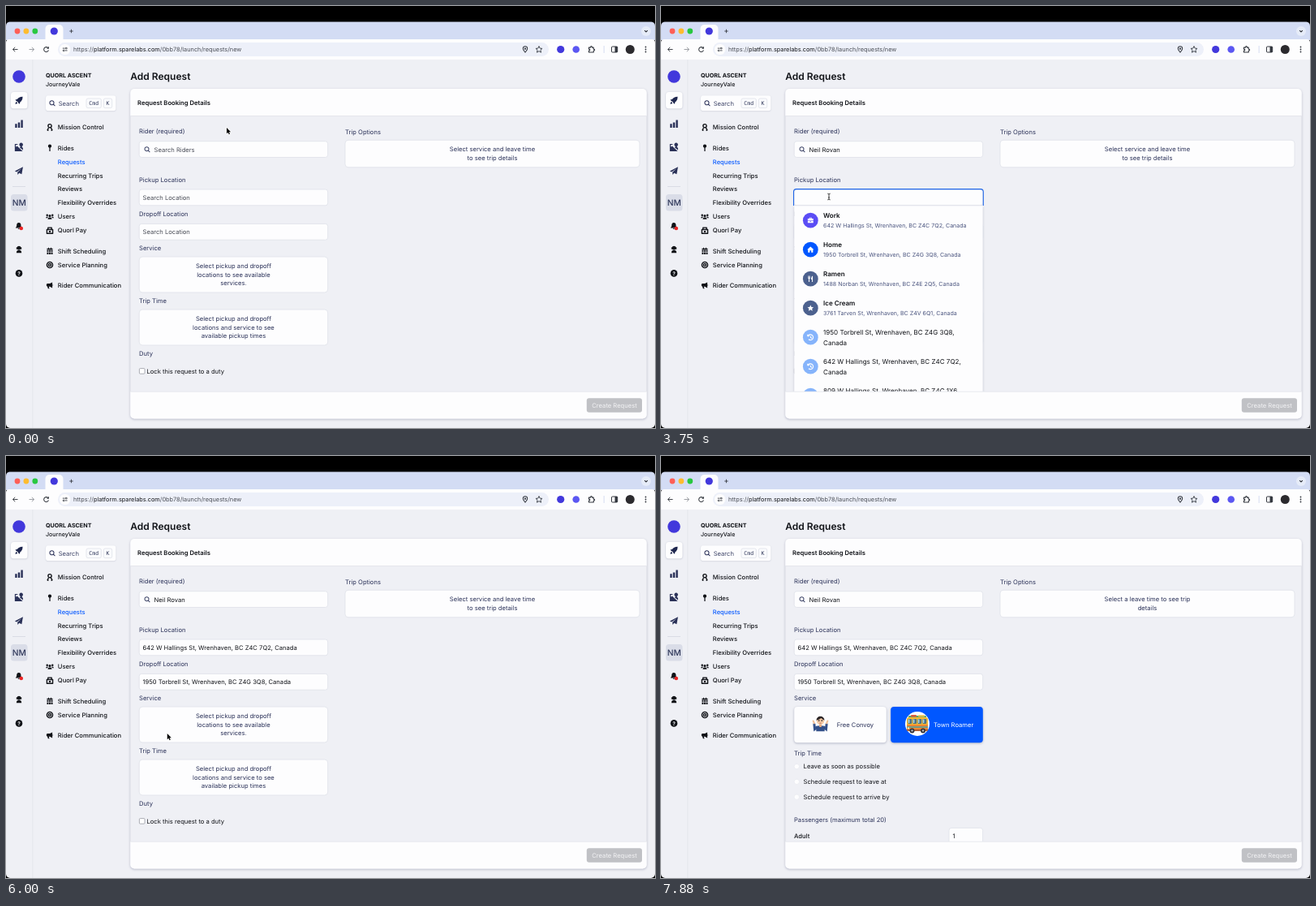
An HTML page with a canvas for the animation above (8000 ms loop, 800 px wide and 520 px high).

```html
<!DOCTYPE html>
<html lang="en">
<head>
<meta charset="utf-8">
<title>Add Request</title>
<style>
html, body { margin: 0; width: 100%; height: 100%; overflow: hidden; background: #000; }
canvas { display: block; width: 800px; height: 520px; }
</style>
</head>
<body>
<canvas id="stage"></canvas>
<script>
const LOOP = 8000;
const cv = document.getElementById('stage');
const c = cv.getContext('2d');
const dpr = window.devicePixelRatio || 1;
cv.width = 800 * dpr;
cv.height = 520 * dpr;

const BODY = 7.62, SMALL = 7.07, MID = 8.05;
const INK = '#111318', NAVY = '#2a3158', SLATE = '#4a547e', BLUE = '#0057ff';
const LINE = '#dfe1e9', WHITE = '#fdfdfe', PAGE = '#eff0f5', LOGO = '#4238dc';

const NAME = 'Neil Rovan', QUERY = NAME.toLowerCase();
const WORK = '642 W Hallings St, Wrenhaven, BC Z4C 7Q2, Canada';
const HOME = '1950 Torbrell St, Wrenhaven, BC Z4G 3Q8, Canada';
const PLACES = [
  ['Work', WORK, '#5b4df5', 'case'],
  ['Home', HOME, BLUE, 'house'],
  ['Ramen', '1488 Norban St, Wrenhaven, BC Z4E 2Q5, Canada', '#4c618e', 'fork'],
  ['Ice Cream', '3761 Tarven St, Wrenhaven, BC Z4V 6Q1, Canada', '#4c618e', 'star']
];
const RECENT = [HOME, WORK, '809 W Hallings St, Wrenhaven, BC Z4C 1X6, Canada'];

// Key times of the interaction, in ms
const T = { focus: 620, list: 745, type: 850, found: 1745, show: 2150, press: 2620, rider: 2750,
  pick: 3740, picked: 4480, drop: 5245, dropped: 5870, cards: 6120, chosen: 7490 };

// Pointer path: time, x, y
const PATH = [[0, 272, 150], [130, 272, 150], [620, 228, 177], [2150, 228, 177], [2500, 217, 202],
  [2750, 217, 202], [3400, 207, 235], [3800, 207, 235], [4250, 212, 264], [4500, 212, 264],
  [4950, 197, 276], [5400, 197, 276], [5760, 199, 342], [6520, 198, 342], [7150, 322, 334], [8000, 322, 334]];

// Glyphs drawn around 0,0; f = filled, s = stroked
const ICONS = {
  search: ['s', 'M-3.6-.6a3 3 0 1 0 6 0a3 3 0 1 0-6 0M1.6 1.6L4 4'],
  rocket: ['f', 'M5-5C1-5-1-3.5-2.5-1.5L-5-1-3.5 1-2.5 1.2-1.2 2.5-1 3.5 1 5 1.5 2.5C3.5 1 5-1 5-5ZM-3.4 2Q-5 2.5-5 5Q-2.5 5-2 3.4Z'],
  bars: ['f', 'M-5 0h2.5v5h-2.5ZM-1.3-2h2.6v7h-2.6ZM2.5-5h2.5v10h-2.5Z'],
  map: ['f', 'M-5.4-4.6H-1.6L-2-3.4H-4.2V-.6L-2.4-1.8 4.8 5H-5.4ZM2-1.4a2.4 2.4 0 1 1 1.6 0L5.2 1V3.4L1 .2Z'],
  plane: ['f', 'M5.2-5.2L3.5 4.2.2 2.8-1.6 5-2 1.8 3.2-3.2-3 1.3-5.4.2Z'],
  bell: ['f', 'M0-5C-2.5-5-3.2-3.2-3.2-1.2S-4 2-5 3H5C4 2 3.2 1 3.2-1.2S2.5-5 0-5ZM-1.5 3.7h3Q0 6-1.5 3.7Z'],
  agent: ['f', 'M0-5.2a3 3 0 1 1 0 6a3 3 0 1 1 0-6ZM-4 5.2Q-4 1.6-1.5 1.4H1.5Q4 1.6 4 5.2ZM-4-3.4h1.5v3h-1.5ZM2.5-3.4h1.5v3h-1.5Z'],
  head: ['s', 'M-2.7-2.3a2.7 2.7 0 1 0 5.4 0a2.7 2.7 0 1 0-5.4 0M-4 5L-2 1.2M4 5L2 1.2M-4 5H-2M4 5H2'],
  pin: ['f', 'M0-5.5a2.7 2.7 0 0 1 .8 5.3V5.5h-1.6V-.2a2.7 2.7 0 0 1 .8-5.3Z'],
  users: ['f', 'M0-3.6a2 2 0 1 1 0 4a2 2 0 1 1 0-4ZM-3.2 4Q-3 1-1 1H1Q3 1 3.2 4ZM-4.2-4a1.6 1.6 0 1 1 0 3.2a1.6 1.6 0 1 1 0-3.2ZM4.2-4a1.6 1.6 0 1 1 0 3.2a1.6 1.6 0 1 1 0-3.2ZM-6.2 2Q-6-.4-4.4-.4L-2.6 0-3.8 2ZM6.2 2Q6-.4 4.4-.4L2.6 0 3.8 2Z'],
  pay: ['s', 'M-4.6-1.5H4.6V4.6H-4.6ZM-2.8-1.5V-4.6H2.8V-1.5M-1.5 1.6H1.5M0 .4V2.8'],
  cal: ['f', 'M-4.5-4h2v-1.4h1.3V-4h2.4v-1.4h1.3V-4h2v2h-9ZM-4.5-1.3h2.5V1h-2.5ZM-1.2-1.3h2.4V1h-2.4ZM2-1.3h2.5V1H2ZM-4.5 1.8h2.5V5h-2.5ZM-1.2 1.8h2.4V5h-2.4ZM2 1.8h2.5V5H2Z'],
  target: ['s', 'M-4.6 0a4.6 4.6 0 1 0 9.2 0a4.6 4.6 0 1 0-9.2 0M-2 0a2 2 0 1 0 4 0a2 2 0 1 0-4 0'],
  horn: ['f', 'M4-5V4L0 2H-1.6L-.6 5H-2.8L-3.8 2Q-5.4 1.6-5.4-.6T-3.8-3H0ZM4.6-1.8q1.6 1.2 0 2.6Z'],
  case: ['f', 'M-2-4.5H2V-3H4.5V.4H-4.5V-3H-2ZM-1-3H1V-3.6H-1ZM-4.5 1H-1V2H1V1H4.5V4H-4.5Z'],
  house: ['f', 'M0-5L5.4 0H4V4.5H1.2V1.4H-1.2V4.5H-4V0H-5.4Z'],
  fork: ['f', 'M-4-5h.7v3h.6v-3h.8v3h.6v-3h.8v4L-1.7.2V5H-3V.2L-4-1ZM3.6-5V5H2.3V1.2H1Q1-4 3.6-5Z'],
  star: ['f', 'M0-5L1.5-1.7 5-1.4 2.4 1 3.2 4.6 0 2.7-3.2 4.6-2.4 1-5-1.4-1.5-1.7Z'],
  clock: ['s', 'M-3.8-2.4A4.4 4.4 0 1 1-3 3.3M-4.6-4.6V-1.9H-1.8M.3-2V.5L2 1.6'],
  back: ['s', 'M5 0H-5M-.6-4.5L-5 0-.6 4.5'],
  reload: ['s', 'M4.6 1.2A4.6 4.6 0 1 1 3.4-3.2M4.6-5V-2.1H1.6'],
  tune: ['s', 'M-5-2.4H0M4-2.4H5M1-2.4a1.5 1.5 0 1 0 3 0a1.5 1.5 0 1 0-3 0M0 2.4H5M-5 2.4H-4M-4 2.4a1.5 1.5 0 1 0 3 0a1.5 1.5 0 1 0-3 0'],
  place: ['s', 'M0 5.4C-2 3-4 .8-4-1.4A4 4 0 0 1 4-1.4C4 .8 2 3 0 5.4ZM-1-1.4a1 1 0 1 0 2 0a1 1 0 1 0-2 0'],
  puzzle: ['s', 'M-4.4-3.4H-1.4Q-1.4-5.6 0-5.6T1.4-3.4H4V-.6Q6-.6 6 .8T4 2.2V5H-4.4V2.2Q-2.4 2.2-2.4.8T-4.4-.6Z'],
  chevron: ['s', 'M-3.4-1.6L0 1.8 3.4-1.6'],
  plus: ['s', 'M-4.4 0H4.4M0-4.4V4.4']
};
for (const k in ICONS) ICONS[k][1] = new Path2D(ICONS[k][1]);

function icon(name, x, y, size, color, lw = 1.4) {
  const [kind, path] = ICONS[name];
  c.save();
  c.translate(x, y);
  c.scale(size / 11, size / 11);
  c.lineJoin = 'round';
  if (kind === 'f') { c.fillStyle = color; c.fill(path); }
  else { c.strokeStyle = color; c.lineWidth = lw; c.stroke(path); }
  c.restore();
}

function shape(fill, stroke, lw) {
  if (fill) { c.fillStyle = fill; c.fill(); }
  if (stroke) { c.strokeStyle = stroke; c.lineWidth = lw; c.stroke(); }
}

function box(x, y, w, h, r, fill, stroke, lw = 0.7) {
  c.beginPath();
  c.roundRect(x, y, w, h, r);
  shape(fill, stroke, lw);
}

function disc(x, y, r, fill, stroke, lw = 0.7) {
  c.beginPath();
  c.arc(x, y, r, 0, 7);
  shape(fill, stroke, lw);
}

// y is the middle of the capitals
function text(s, x, y, color = NAVY, size = BODY, weight = 400, align = 'left', face = 'Inter, sans-serif') {
  c.font = `${weight} ${size}px ${face}`;
  c.textAlign = align;
  c.fillStyle = color;
  c.fillText(s, x, y + size * 0.364);
  return c.measureText(s).width;
}

function lifted(draw, blur, y, color) {
  c.save();
  c.shadowColor = color;
  c.shadowBlur = blur * dpr;
  c.shadowOffsetY = y * dpr;
  draw();
  c.restore();
}

function browser() {
  box(0, 19, 800, 23, 0, '#d3dcf4');
  ['#fe5f57', '#febc2e', '#28c840'].forEach((col, i) => disc(14 + 10.9 * i, 31, 3.4, col));
  box(48.5, 23, 22, 20, [5, 5, 0, 0], WHITE);
  disc(59.3, 31, 4.6, LOGO);
  icon('plus', 80.5, 31, 5.6, '#33373f', 1.7);
  disc(789, 31, 6, '#e6ecf9');
  icon('chevron', 789, 31, 6, '#25282e', 1.9);

  box(0, 41, 800, 25, [4, 4, 0, 0], WHITE);
  icon('back', 11.5, 53.5, 6.6, '#3c4047', 1.6);
  c.save(); c.translate(31.5, 53.5); c.scale(-1, 1);
  icon('back', 0, 0, 6.6, '#9a9da4', 1.6);
  c.restore();
  icon('reload', 49.5, 53.5, 7, '#3c4047', 1.7);
  box(64, 45, 605, 17, 8.5, '#edf0f9');
  disc(72.7, 53.5, 6.6, WHITE);
  icon('tune', 72.7, 53.5, 6.4, '#3c4047', 1.5);
  let x = 83;
  for (const [s, col] of [['https://', '#4b4f57'], ['platform.sparelabs.com', '#17191d'], ['/0bb78/launch/requests/new', '#4b4f57']])
    x += text(s, x, 53.5, col, 7.35);
  icon('place', 640, 53.5, 7.4, '#33373f', 1.5);
  c.save(); c.translate(657, 53.5); c.scale(.8, .8);
  c.strokeStyle = '#33373f'; c.lineWidth = 1.1; c.stroke(ICONS.star[1]);
  c.restore();
  disc(683.7, 53.5, 4.6, LOGO);
  disc(702.7, 53.5, 4.3, '#5b57f2');
  icon('puzzle', 721.5, 53.5, 7.6, '#33373f', 1.6);
  box(736.7, 49, 0.8, 9, 0, '#ccd5ee');
  box(746.5, 50, 7.2, 7, 1, null, '#33373f', 1);
  box(750.5, 50, 3.2, 7, 0, '#33373f');
  disc(769.3, 53.5, 5.5, '#2b2a2e');
  for (let i = -1; i < 2; i++) disc(788.5, 53.5 + i * 3, 0.9, '#33373f');
}

function rail() {
  box(0, 66, 800, 454, 0, PAGE);
  box(32.5, 66, 0.8, 454, 0, '#e1e3ea');
  disc(16, 87, 7.8, LOGO);
  lifted(() => box(6, 106, 20.5, 20.5, 3.5, WHITE), 2, 0.6, 'rgba(40,48,90,.25)');
  icon('rocket', 16, 116.3, 10, '#1f274f');
  icon('bars', 16, 145.3, 10.5, '#2a3158');
  icon('map', 16, 174.3, 10.5, '#2a3158');
  icon('plane', 16, 203.2, 10.5, '#2a3158');
  box(8, 222, 16, 0.8, 0, '#d3d6e0');
  box(6, 232, 20.5, 20.5, 3.5, '#dadde8');
  text('NM', 16.2, 242.2, '#2d3558', 10.2, 500, 'center');
  icon('bell', 15.8, 271, 9, INK);
  disc(18.8, 274, 2.3, '#ea2626');
  icon('agent', 16, 300, 8.8, INK);
  disc(16, 329.4, 4.3, INK);
  text('?', 16, 329.4, '#fff', 6.4, 700, 'center');
}

const NAV = [['Mission Control', 149.5, 'head'], ['Rides', 174.8, 'pin'], ['Requests', 191.8], ['Recurring Trips', 208.8],
  ['Reviews', 225.7], ['Flexibility Overrides', 242.7], ['Users', 259.7, 'users'], ['Quorl Pay', 276.7, 'pay'],
  ['Shift Scheduling', 302, 'cal'], ['Service Planning', 319, 'target'], ['Rider Communication', 344.3, 'horn']];

function sidebar() {
  text('QUORL ASCENT', 49, 85, INK, 7.15, 700);
  text('JourneyVale', 49, 96.1, INK, SMALL, 500);
  lifted(() => box(49, 110.3, 86.5, 19, 3, WHITE), 1.5, 0.5, 'rgba(40,48,90,.2)');
  icon('search', 57, 119.8, 9.4, NAVY, 1.2);
  text('Search', 64.7, 119.8, '#3e4568');
  for (const [s, x, w] of [['Cmd', 99, 18.4], ['K', 120.3, 10.4]]) {
    box(x, 114, w, 11.6, 2, '#fafbfd', LINE, 0.8);
    text(s, x + w / 2, 120, '#2d3558', 6.5, 400, 'center', 'DejaVu Sans Mono, monospace');
  }
  for (const [s, y, ic] of NAV) {
    if (ic) icon(ic, 54, y, 8.6, INK, 1.8);
    text(s, 63.8, y, s === 'Requests' ? '#0a5cff' : INK, BODY, 500);
  }
}

function field(y, s, color, ic) {
  box(164.2, y, 232.5, 19.8, 3, WHITE, LINE, 0.8);
  if (ic) icon('search', 174, y + 10, 9.2, '#3e4568', 1.2);
  text(s, ic ? 182.5 : 168.5, y + 10.1, color);
}

function panel(x, y, w, h, lines) {
  box(x, y, w, h, 4, WHITE, LINE, 0.8);
  const y0 = y + h / 2 - (lines.length - 1) * 5.3;
  lines.forEach((s, i) => text(s, x + w / 2, y0 + i * 10.6, NAVY, BODY, 400, 'center'));
}

function focusRing(y) {
  const l = 163.5, r = 397.3, b = y + 20.5;
  c.beginPath();
  c.moveTo(l, b);
  c.arcTo(l, y, l + 4, y, 3.4);
  c.arcTo(r, y, r, b, 3.4);
  c.lineTo(r, b);
  shape(null, '#1f66e8', 1.1);
}

function listBack(y, h) {
  lifted(() => box(164.2, y, 232.5, h, [0, 0, 3, 3], WHITE), 3, 1, 'rgba(40,48,90,.25)');
}

function addRow(y) {
  disc(185.6, y, 10.5, BLUE);
  icon('plus', 185.6, y, 8, '#fff', 2);
  text('Add Rider', 202.5, y + 0.3, INK, MID, 500);
}

function riderList(t) {
  if (t < T.found) {
    listBack(187, 31.5);
    addRow(202.5);
    return;
  }
  listBack(187, 67.5);
  box(164.2, 187, 232.5, 35.5, 0, t >= T.show + 150 ? '#ebedf2' : WHITE);
  disc(185.6, 204.8, 10.5, '#d8dce8');
  text('NR', 185.6, 205, NAVY, 9.6, 400, 'center');
  text(NAME, 202.5, 198.6, INK, MID, 600);
  text('+15550142963 · northrovane@example.com', 202.5, 211.2, SLATE, SMALL);
  addRow(238.6);
}

function placeList(top, p) {
  listBack(top, 260);
  const hover = p.y > top ? Math.floor((p.y - top) / 36) : -1;
  if (hover >= 0) box(164.2, top + hover * 36, 232.5, 36, 0, '#ebedf2');
  PLACES.forEach(([name, addr, col, ic], i) => {
    const y = top + 18 + i * 36;
    disc(184.3, y, 9.4, col);
    icon(ic, 184.3, y, 8.4, '#fff');
    text(name, 200, y - 6, INK, MID, 600);
    text(addr, 200, y + 6.5, SLATE, SMALL);
  });
  RECENT.forEach((addr, i) => {
    const y = top + 162 + i * 36, cut = addr.lastIndexOf(' ');
    disc(184.3, y, 9.4, '#86b4fb');
    icon('clock', 184.3, y, 8.4, '#fff', 1.5);
    text(addr.slice(0, cut), 200, y - 6.2, INK, MID);
    text(addr.slice(cut + 1), 200, y + 6.5, INK, MID);
  });
}

function shrugger(x, y) {
  c.save();
  c.translate(x, y);
  c.lineCap = 'round';
  for (const s of [-1, 1]) {
    c.beginPath();
    c.moveTo(s * 4, 4); c.lineTo(s * 7, 6.5); c.lineTo(s * 7.6, 0.5);
    shape(null, '#34518a', 3);
    c.beginPath();
    c.moveTo(s * 7.6, -0.8); c.lineTo(s * 8.8, -3.4);
    shape(null, '#f2c29c', 2.2);
  }
  box(-5.2, 2.2, 10.4, 7, [4, 4, 0, 0], '#34518a');
  box(-1.5, 0, 3, 4, 1, '#e5ad85');
  disc(0, -3.6, 4.7, '#f6cba6');
  c.beginPath();
  c.arc(0, -4.3, 5, Math.PI, 0);
  c.quadraticCurveTo(2.5, -5.4, 1, -7);
  c.quadraticCurveTo(-2, -4.8, -5, -4.3);
  shape('#2b2527');
  for (const s of [-1, 1]) {
    disc(s * 1.8, -3.6, 0.65, '#2b2527');
    box(s * 1.8 - 1, -5, 2, 0.6, 0, '#2b2527');
  }
  box(-1.3, -1.3, 2.6, 0.7, 0.3, '#a85548');
  c.restore();
}

function bus(x, y) {
  c.save();
  c.translate(x, y);
  box(-11, -10.5, 22, 3, 1.2, '#58a86b');
  box(-8, -11.3, 7, 2.4, 1, '#d95c41');
  box(1, -11.1, 8, 2.2, 1, '#e6c04c');
  box(-13, -8.5, 26, 17, 2.5, '#f5b932');
  box(-13, 0.5, 26, 8, [0, 0, 2.5, 2.5], '#ee8632');
  box(-13, 2.8, 26, 1.6, 0, '#4aa2a0');
  for (let i = 0; i < 4; i++) {
    box(-11.6 + i * 6, -6.5, 4.8, 6, 0.8, '#4d7286');
    box(-11.2 + i * 6, -6, 1.6, 4.6, 0.4, '#a9d6e2');
  }
  box(-13, 6.8, 26, 1.4, 0.5, '#8b4a34');
  disc(-11, 4.9, 1.1, '#fff2b8');
  for (const wx of [-6.5, 7]) {
    disc(wx, 8, 3, '#33333a');
    disc(wx, 8, 1.2, '#b9bcc4');
  }
  c.restore();
}

function serviceCards(chosen) {
  lifted(() => {
    box(164.2, 309, 113.6, 44.2, 4, WHITE);
    box(283.2, 309, 113.6, 44.2, 4, chosen ? BLUE : WHITE);
  }, 3, 0.9, 'rgba(40,48,90,.35)');
  shrugger(196.5, 330);
  text('Free Convoy', 216.8, 331.2, NAVY);
  if (chosen) disc(316, 330, 15, '#fff');
  bus(316, 330.4);
  text('Town Roamer', 336, 331.2, chosen ? '#fff' : NAVY);
}

function tripTimes() {
  ['Leave as soon as possible', 'Schedule request to leave at', 'Schedule request to arrive by'].forEach((s, i) => {
    const y = 382.6 + i * 18.8;
    disc(167.3, y, 3.2, WHITE, '#e4e6ed', 0.6);
    text(s, 175.6, y, INK);
  });
  text('Passengers (maximum total 20)', 164, 448.3);
  text('Adult', 164, 468, INK, BODY, 500);
  box(355, 458.3, 41.6, 20, 3, WHITE, LINE, 0.8);
  text('1', 359.5, 468, INK);
}

function form(t, p) {
  const typed = Math.max(0, Math.min(QUERY.length, Math.floor((t - T.type) / 70) + 1));
  const pickOpen = t >= T.pick && t < T.picked;
  const dropOpen = t >= T.drop && t < T.dropped;
  const cards = t >= T.cards, chosen = t >= T.chosen;
  const dy = cards ? 3 : 0;

  text('Rider (required)', 164, 154.7);
  const focused = t >= T.focus && t < T.press;
  const rider = t >= T.rider ? NAME : t >= T.focus && typed ? QUERY.slice(0, typed) : 'Search Riders';
  field(166.7, rider, rider === 'Search Riders' ? '#4a4d57' : INK, true);
  if (focused && typed) {
    c.font = `400 ${BODY}px Inter, sans-serif`;
    box(182.9 + c.measureText(rider).width, 172.4, 0.8, 8.4, 0, INK);
  }
  text('Trip Options', 418, 155.5);
  panel(418, 165.2, 363, 33.6, chosen ? ['Select a leave time to see trip', 'details'] : ['Select service and leave time', 'to see trip details']);

  text('Pickup Location', 164, 213.8);
  field(226, t >= T.picked ? WORK : pickOpen ? '' : 'Search Location', t >= T.picked ? INK : '#4a4d57');
  text('Dropoff Location', 164, 256.2);
  field(268.4, t >= T.dropped ? HOME : dropOpen ? '' : 'Search Location', t >= T.dropped ? INK : '#4a4d57');

  text('Service', 164, 298.6);
  if (cards) serviceCards(chosen);
  else panel(164.2, 309, 232.5, 44, ['Select pickup and dropoff', 'locations to see available', 'services.']);
  text('Trip Time', 164, 363.6 + dy);
  if (chosen) tripTimes();
  else {
    panel(164.2, 374 + dy, 232.5, 44, ['Select pickup and dropoff', 'locations and service to see', 'available pickup times']);
    text('Duty', 164, 428.4 + dy);
    box(164.4, 446.6 + dy, 6.6, 6.6, 1, '#fff', '#8b8e98', 0.7);
    text('Lock this request to a duty', 173.5, 450.6 + dy, INK);
  }

  if (t >= T.list && t < T.rider) riderList(t);
  if (pickOpen) placeList(246.2, p);
  if (dropOpen) placeList(288.6, p);
  if (focused) focusRing(166.4);
  if (pickOpen) focusRing(225.6);
  if (dropOpen) focusRing(267.9);
}

function mainCard(t, p) {
  text('Add Request', 153.3, 86.8, INK, 12, 600);
  lifted(() => box(153.3, 102, 636.4, 406.5, 5, PAGE), 3, 1, 'rgba(40,48,90,.3)');
  box(153.3, 102, 636.4, 33.5, [5, 5, 0, 0], WHITE);
  box(153.3, 135, 636.4, 0.8, 0, LINE);
  text('Request Booking Details', 162, 119, INK, 7.68, 600);
  c.save();
  c.beginPath();
  c.rect(153.3, 135.8, 636.4, 339.2);
  c.clip();
  form(t, p);
  c.restore();
  box(153.3, 475, 636.4, 33.5, [0, 0, 5, 5], WHITE);
  box(153.3, 474.7, 636.4, 0.8, 0, LINE);
  box(715.8, 483.2, 68.2, 17.6, 3, '#c0c1c5');
  text('Create Request', 750, 492, '#f3f3f5', BODY, 400, 'center');
}

function pointer(t) {
  let i = 0;
  while (i < PATH.length - 2 && t >= PATH[i + 1][0]) i++;
  const [t0, x0, y0] = PATH[i], [t1, x1, y1] = PATH[i + 1];
  const k = Math.min(1, (t - t0) / (t1 - t0)), e = k * k * (3 - 2 * k);
  return { x: x0 + (x1 - x0) * e, y: y0 + (y1 - y0) * e };
}

const ARROW = new Path2D('M0 0V7.2L1.7 5.7 2.8 8.3 4 7.8 2.9 5.3H5.1Z');
const HAND = new Path2D('M-.8.8Q-.8 0 0 0T.8.8V3L3.2 3.4Q4.8 3.8 4.6 5.4L4 8.6H-.6L-3 5.4Q-3.2 4.2-2 4.4L-.8 5.3Z');
const BEAM = new Path2D('M-1.7-3.8Q0-3.8 0-2.8Q0-3.8 1.7-3.8M0-2.8V2.8M-1.7 3.8Q0 3.8 0 2.8Q0 3.8 1.7 3.8M-.8 1H.8');

function cursor(t, { x, y }) {
  if ((t >= T.type && t < T.show) || t >= T.chosen) return;
  const within = (a, b) => y >= a && y <= b;
  const list = t >= T.show && t < T.rider ? 187 : t >= T.pick && t < T.picked ? 246 : t >= T.drop && t < T.dropped ? 288.6 : 999;
  const hand = y > list || (t >= T.cards && within(309, 353));
  const beam = !hand && (within(167, 187) || within(226, 246) || within(268, 288));
  c.save();
  c.translate(x, y);
  c.lineJoin = 'round';
  if (beam) {
    c.strokeStyle = '#111'; c.lineWidth = 0.8; c.stroke(BEAM);
  } else {
    const path = hand ? HAND : ARROW;
    c.strokeStyle = hand ? '#111' : '#fff';
    c.lineWidth = hand ? 1.1 : 1.3;
    c.stroke(path);
    c.fillStyle = hand ? '#fff' : '#000';
    c.fill(path);
  }
  c.restore();
}

function render(t) {
  c.setTransform(dpr, 0, 0, dpr, 0, 0);
  c.textRendering = 'geometricPrecision';
  c.fillStyle = '#000';
  c.fillRect(0, 0, 800, 520);
  c.save();
  c.beginPath();
  c.roundRect(0, 19.4, 800, 500.6, 5);
  c.clip();
  const p = pointer(t);
  browser();
  rail();
  sidebar();
  mainCard(t, p);
  cursor(t, p);
  c.restore();
}

const start = performance.now();
function tick() {
  render((performance.now() - start) % LOOP);
  requestAnimationFrame(tick);
}
tick();
</script>
</body>
</html>
```
